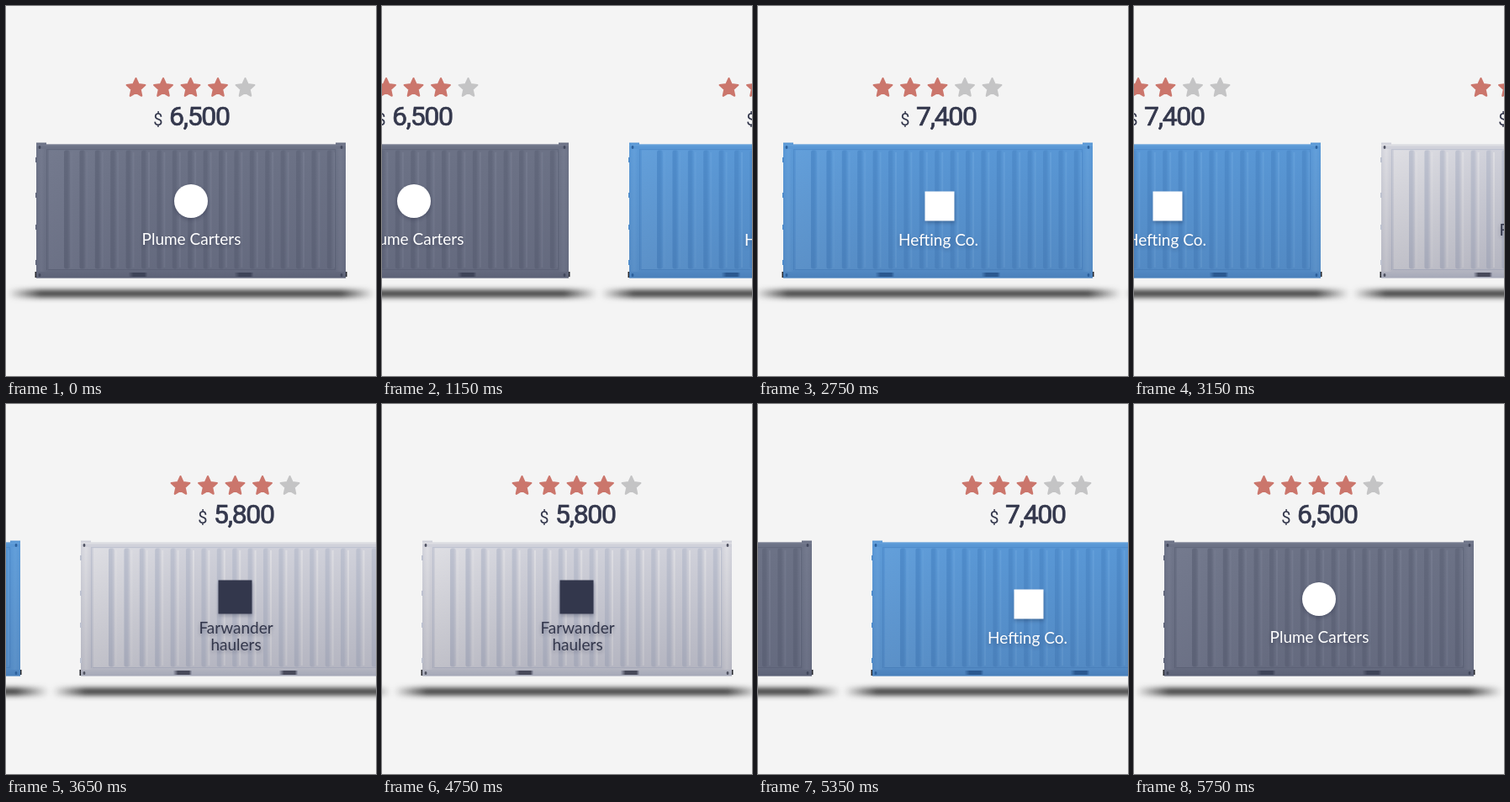
An HTML page with a canvas for the animation above (6 s loop, 440x440 px).

```html
<!DOCTYPE html>
<html lang="en">
<head>
<meta charset="utf-8">
<title>Container quotes</title>
<style>
  html, body { margin: 0; width: 100%; height: 100%; overflow: hidden; background: #f4f4f4; }
  canvas { display: block; width: 440px; height: 440px; }
</style>
</head>
<body>
<canvas id="stage"></canvas>
<script>
const SIZE = 440, LOOP = 6000, FPS = 15, PAD = 24;
const NAME_FONT = 'Lato, "Open Sans", sans-serif';
const PRICE_FONT = 'Roboto, "Liberation Sans", sans-serif';
const INK = '#33374c';

const quotes = [
  { stars: 4, price: '6,500', name: ['Plume Carters'], ink: '#fff', baseline: 283.5,
    mark: { round: true, x: 220, y: 232, size: 40 },
    base: '#6c7286', hi: '#747a8e', lo: '#62687c', deep: '#41475b', shade: 0.1 },
  { stars: 3, price: '7,400', name: ['Hefting Co.'], ink: '#fff', baseline: 284.5,
    mark: { x: 222, y: 238, size: 35 },
    base: '#5997d5', hi: '#639fda', lo: '#4f8ccb', deep: '#2b5f9b', shade: 0.12 },
  { stars: 4, price: '5,800', name: ['Farwander', 'haulers'], ink: INK, baseline: 273,
    mark: { x: 219.5, y: 229.5, size: 40 },
    base: '#d0d1da', hi: '#dedee3', lo: '#bec2d0', deep: '#4f5160', shade: 0.17 }
];

const dpr = window.devicePixelRatio || 1;
const stage = document.getElementById('stage');
const ctx = setup(stage, SIZE);

function setup(canvas, width) {
  canvas.width = width * dpr;
  canvas.height = SIZE * dpr;
  const c = canvas.getContext('2d');
  c.scale(dpr, dpr);
  return c;
}

function box(c, color, x, y, w, h) {
  c.fillStyle = color;
  c.fillRect(x, y, w, h);
}

function blend(c, x0, y0, x1, y1, ...stops) {
  const g = c.createLinearGradient(x0, y0, x1, y1);
  stops.forEach(([at, color]) => g.addColorStop(at, color));
  return g;
}

function drawStar(c, x, y, color) {
  c.beginPath();
  for (let i = 0; i < 10; i++) {
    const r = i % 2 ? 5.4 : 11.4, a = (i / 5 - 0.5) * Math.PI;
    c.lineTo(x + r * Math.cos(a), y + r * Math.sin(a));
  }
  c.closePath();
  c.fillStyle = c.strokeStyle = color;
  c.lineWidth = 2.2;
  c.lineJoin = 'round';
  c.fill();
  c.stroke();
}

function drawPrice(c, price) {
  const small = `400 20px ${PRICE_FONT}`, large = `400 32px ${PRICE_FONT}`, gap = 7.5;
  c.fillStyle = c.strokeStyle = INK;
  c.textAlign = 'left';
  c.font = small;
  const signWidth = c.measureText('$').width;
  c.font = large;
  c.letterSpacing = '-1.3px';
  const x = 220.5 - (signWidth + gap + c.measureText(price).width) / 2;
  // A thin round outline softens the stroke ends
  c.lineWidth = 0.7;
  c.lineJoin = 'round';
  c.strokeText(price, x + signWidth + gap, 142);
  c.fillText(price, x + signWidth + gap, 142);
  c.letterSpacing = '0px';
  c.font = small;
  c.fillText('$', x, 142);
}

function drawShadow(c) {
  c.save();
  c.filter = `blur(${3.4 * dpr}px)`;
  c.fillStyle = blend(c, 2, 0, 438, 0,
    [0, 'rgba(50,50,50,0)'], [0.09, 'rgba(50,50,50,.95)'],
    [0.91, 'rgba(50,50,50,.95)'], [1, 'rgba(50,50,50,0)']);
  c.beginPath();
  c.roundRect(2, 337.5, 436, 9, 4.5);
  c.fill();
  c.restore();
}

function drawContainer(c, { base, hi, lo, deep, shade }) {
  c.save();
  c.beginPath();
  c.rect(36, 164.5, 368, 159);
  c.rect(36, 162.5, 12, 4);
  c.rect(392, 162.5, 12, 4);
  c.clip();
  box(c, base, 36, 162, 368, 162);

  // Corrugated wall
  box(c, blend(c, 51, 0, 391, 0, [0, hi], [0.35, base], [1, base]), 51, 171, 340, 143);
  for (let i = 0; i < 18; i++) {
    const x = 69 + i * 18.4;
    c.fillStyle = blend(c, x, 0, x + 7, 0, [0, lo], [0.55, lo], [1, base]);
    c.beginPath();
    c.roundRect(x, 171.5, 7, 141, 2.5);
    c.fill();
    box(c, hi, x + 8, 174, 2, 137);
  }

  // Rails and posts
  box(c, hi, 36, 164.5, 368, 2);
  box(c, lo, 48, 170, 344, 1.2);
  box(c, lo, 50, 313, 342, 1.2);
  box(c, blend(c, 0, 314, 0, 324, [0, base], [1, lo]), 36, 314.2, 368, 9.3);
  for (const x of [36, 392]) {
    box(c, blend(c, x, 0, x + 12, 0, [0, base], [0.5, hi], [1, base]), x, 170, 12, 146);
  }
  box(c, lo, 48, 171, 1.2, 143);
  box(c, lo, 391, 171, 1.2, 143);

  // Fork pockets
  for (const x of [146, 272]) {
    box(c, blend(c, x, 0, x + 22, 0, [0, lo], [0.25, deep], [0.85, deep], [1, lo]), x, 317, 22, 5);
  }

  // The wall darkens towards the ground
  box(c, blend(c, 0, 171, 0, 324, [0, 'rgba(35,35,60,0)'], [1, `rgba(35,35,60,${shade})`]),
    36, 162, 368, 162);
  c.restore();

  // Corner holes, feet and hinges
  c.fillStyle = deep;
  for (const x of [40, 399]) {
    for (const y of [168, 320]) {
      c.beginPath();
      c.ellipse(x, y, 1.4, 2, 0, 0, Math.PI * 2);
      c.fill();
    }
  }
  box(c, '#25262c', 34.5, 316, 1.5, 7);
  box(c, '#25262c', 404, 316, 1.5, 6);
  for (const y of [180, 222, 260, 302]) box(c, lo, 35, y, 2, 6);
}

function drawBrand(c, { name, ink, baseline, mark }) {
  c.save();
  c.shadowColor = 'rgba(20,25,50,.28)';
  c.shadowBlur = 4 * dpr;
  c.shadowOffsetY = 2 * dpr;
  c.fillStyle = ink;
  c.beginPath();
  const r = mark.size / 2;
  if (mark.round) c.arc(mark.x, mark.y, r, 0, Math.PI * 2);
  else c.rect(mark.x - r, mark.y - r, mark.size, mark.size);
  c.fill();
  c.font = `400 19px ${NAME_FONT}`;
  c.textAlign = 'center';
  name.forEach((line, i) => c.fillText(line, 220.5, baseline + i * 19.5));
  c.restore();
}

function makeSlide(quote) {
  const canvas = document.createElement('canvas');
  const c = setup(canvas, SIZE + 2 * PAD);
  c.translate(PAD, 0);
  for (let i = 0; i < 5; i++) {
    drawStar(c, 154.5 + i * 32.5, 97.5, i < quote.stars ? '#cb766c' : '#c4c4c5');
  }
  drawPrice(c, quote.price);
  drawShadow(c);
  drawContainer(c, quote);
  drawBrand(c, quote);
  return canvas;
}

const slides = quotes.map(makeSlide);

const ramp = (t, start) => Math.min(1, Math.max(0, (t - start) / 1000));

// Two steps forward, then one long sweep back
function scrollAt(t) {
  return SIZE * (ramp(t, 720) + ramp(t, 2720) - 2 * ramp(t, 4720));
}

function render(now) {
  const t = Math.floor((now % LOOP) * FPS / 1000 + 1e-6) * 1000 / FPS;
  const scroll = Math.round(scrollAt(t));
  box(ctx, '#f4f4f4', 0, 0, SIZE, SIZE);
  slides.forEach((slide, i) => {
    const x = i * SIZE - scroll - PAD;
    if (x < SIZE && x > -SIZE - 2 * PAD) ctx.drawImage(slide, x, 0, SIZE + 2 * PAD, SIZE);
  });
}

const start = performance.now();
function tick() {
  render(performance.now() - start);
  requestAnimationFrame(tick);
}
tick();
</script>
</body>
</html>
```
